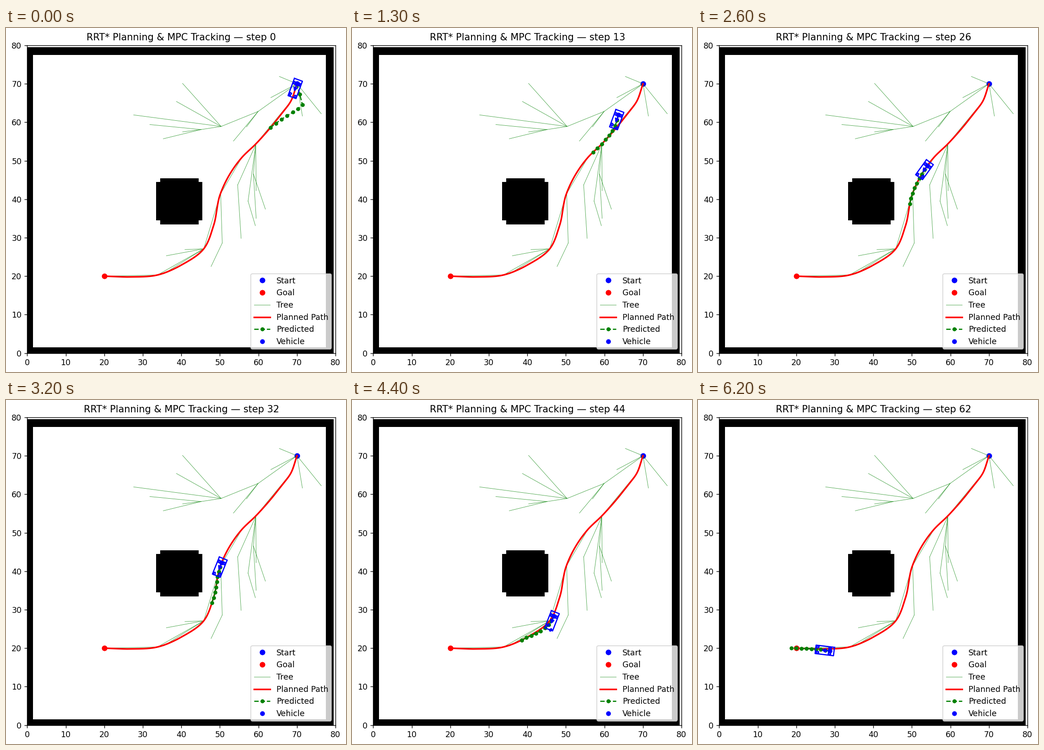
These frames come from a looping animation (743 by 753 pixels, 6.3 s). A matplotlib script:

```python
import numpy as np
import matplotlib.pyplot as plt
from matplotlib.animation import FuncAnimation

W, H, DPI = 743, 753, 125
STEPS = 63
HORIZON = 8
CRUISE = 1.25

# Vehicle dimensions; wheel sizes are half extents
LENGTH, WIDTH, REAR, BASE = 4.8, 2.2, 1.1, 3.2
WHEEL_LEN, WHEEL_WIDTH, TREAD = 0.3, 0.2, 0.7

START, GOAL = (70, 70), (20, 20)
ROUTE = np.array([
    START, (68.3, 65.3), (66.3, 62.6), (59.25, 54.3), (55.7, 50.85),
    (50.05, 41.2), (48.4, 33.3), (45.8, 27.1), (40.2, 23), (33.8, 20.3),
    (27, 19.8), GOAL])

# Side branches: hub -> tips
BRANCHES = {
    START: [(65.4, 71.9), (63.2, 66.4), (71.4, 61.6), (76.3, 62.2),
            (59.9, 62.8)],
    (59.9, 62.8): [(50.3, 58.9), (56.9, 58.8), (53.5, 55.1)],
    (50.3, 58.9): [(40.3, 70.1), (38.7, 65.4), (27.6, 61.9), (45.1, 58.1)],
    (45.1, 58.1): [(31.8, 59.4), (40.3, 57.5), (35.3, 55.7)],
    (59.3, 54.2): [(54.6, 43.7), (57.3, 39.5), (58.7, 46.5), (59.4, 42.2)],
    (54.6, 43.7): [(55.5, 29.8)],
    (57.3, 39.5): [(59.2, 33.1)],
    (58.7, 46.5): [(59.4, 35), (61.8, 37.4)],
    (50.2, 41.2): [(50.6, 28.6)],
    (50.6, 28.6): [(47.7, 22.5)],
    (45.8, 27.1): [(40.9, 26.9), (36.1, 25.3), (35.4, 20.6)],
}


def smooth(t, knots, values):
    """Cubic Hermite curve through the knots."""
    slope = np.gradient(values, knots)
    i = np.clip(np.searchsorted(knots, t, side="right") - 1, 0, len(knots) - 2)
    h = knots[i + 1] - knots[i]
    u = (t - knots[i]) / h
    return ((1 + 2 * u) * (1 - u) ** 2 * values[i]
            + u * (1 - u) ** 2 * h * slope[i]
            + u * u * (3 - 2 * u) * values[i + 1]
            + u * u * (u - 1) * h * slope[i + 1])


def arc_length(points):
    return np.r_[0, np.cumsum(np.hypot(*np.diff(points, axis=0).T))]


def bump(n, centre, width):
    return np.exp(-((n - centre) / width) ** 2)


def rotate(points, angle):
    c, s = np.cos(angle), np.sin(angle)
    return points @ np.array([[c, s], [-s, c]])


def box(x0, x1, y0, y1):
    return np.array([(x0, y0), (x1, y0), (x1, y1), (x0, y1), (x0, y0)])


route_arc = arc_length(ROUTE)
fine = np.linspace(0, route_arc[-1], 900)
path = np.column_stack([smooth(fine, route_arc, c) for c in ROUTE.T])

# The tracked line runs a little past the goal
track = np.vstack([path, [(19, 20), (18, 20)]])
arc = arc_length(track)
heading = np.unwrap(np.arctan2(*np.gradient(track, axis=0).T[::-1]))


def travel(n):
    """Distance along the track: a soft start, then slowly easing off."""
    return 1.33 * n - 0.0017 * n ** 2 - 6.5 * np.tanh(n / 5)


def drift(n):
    """Offset to the left of the track: one early cut, two late overshoots."""
    return (0.85 * bump(n, 48.5, 4) + 0.9 * bump(n, 59, 4.5)
            - 2.3 * bump(n, 10.5, 4.5))


def yaw_at(n):
    slope = (drift(n + 0.5) - drift(n - 0.5)) / CRUISE
    return np.interp(travel(n), arc, heading) + np.arctan(slope)


def place(s, side):
    """Points at distance s along the track, moved sideways."""
    x, y, a = (np.interp(s, arc, c) for c in (*track.T, heading))
    return np.array([x - side * np.sin(a), y + side * np.cos(a)])


def prediction(n):
    k = np.arange(HORIZON + 1)
    u = k / HORIZON
    reach = 11.8 - 0.03 * n + 1.7 * np.exp(-n / 8)
    points = place(travel(n) + reach * u * (0.92 + 0.08 * u),
                   drift(n + 1.1 * k) * (1 - u))
    # The first solution swings wide and settles at once
    swing = 2.4 * np.exp(-3 * n) * np.interp(k, [0, 2, HORIZON], [0, 1, 0])
    return points + np.array([swing, -swing])


def car_outline(pos, yaw, steer):
    right = box(-WHEEL_LEN, WHEEL_LEN, -WHEEL_WIDTH - TREAD, WHEEL_WIDTH - TREAD)
    left = right * (1, -1)
    parts = [box(-REAR, LENGTH - REAR, -WIDTH / 2, WIDTH / 2), right, left]
    parts += [rotate(w, steer) + (BASE, 0) for w in (right, left)]
    gap = np.full((1, 2), np.nan)
    joined = np.vstack([q for p in parts for q in (p, gap)])
    return rotate(joined, yaw) + pos


# Occupancy grid: outer wall and one block with clipped corners
grid = np.ones((80, 80))
grid[2:78, 2:78] = 0
grid[34:46, 35:45] = 1
grid[35:45, 34:46] = 1

fig = plt.figure(figsize=(W / DPI, H / DPI), dpi=DPI)
SIDE = 673.75
ax = fig.add_axes([46.4 / W, 41.4 / H, SIDE / W, SIDE / H])
ax.imshow(grid, cmap="gray_r", origin="lower", aspect="auto",
          interpolation="nearest", vmin=0, vmax=1)
ax.set(xlim=(0, 80), ylim=(0, 80))

ax.plot(*START, "bo", ms=6, label="Start")
ax.plot(*GOAL, "ro", ms=6, label="Goal")
twig = dict(color="g", lw=0.5, alpha=0.75)
trunk = np.delete(ROUTE, [2, 6, 8, 10], axis=0)
ax.plot(*trunk.T, label="Tree", **twig)
for hub, tips in BRANCHES.items():
    for tip in tips:
        ax.plot(*zip(hub, tip), **twig)
ax.plot(*path.T, "r-", lw=2, label="Planned Path")
predicted, = ax.plot([], [], "g--o", ms=4, label="Predicted")
car, = ax.plot([], [], "b-")
dot, = ax.plot([], [], "bo", ms=5, label="Vehicle")
arrow = ax.arrow(0, 0, 1, 0, head_width=1, head_length=1,
                 fc="b", ec="b", zorder=3)
ax.legend(loc="lower right")
title = ax.set_title("")


def update(n):
    pos, yaw = place(travel(n), drift(n)), yaw_at(n)
    steer = np.clip(yaw_at(n + 5) - yaw, -np.pi / 4, np.pi / 4)
    predicted.set_data(*prediction(n))
    car.set_data(*car_outline(pos, yaw, steer).T)
    dot.set_data(*pos[:, None])
    arrow.set_data(x=pos[0], y=pos[1], dx=np.cos(yaw), dy=np.sin(yaw))
    title.set_text(f"RRT* Planning & MPC Tracking — step {n}")
    return predicted, car, dot, arrow, title


anim = FuncAnimation(fig, update, frames=STEPS, interval=100, repeat=True)
plt.show()
```
